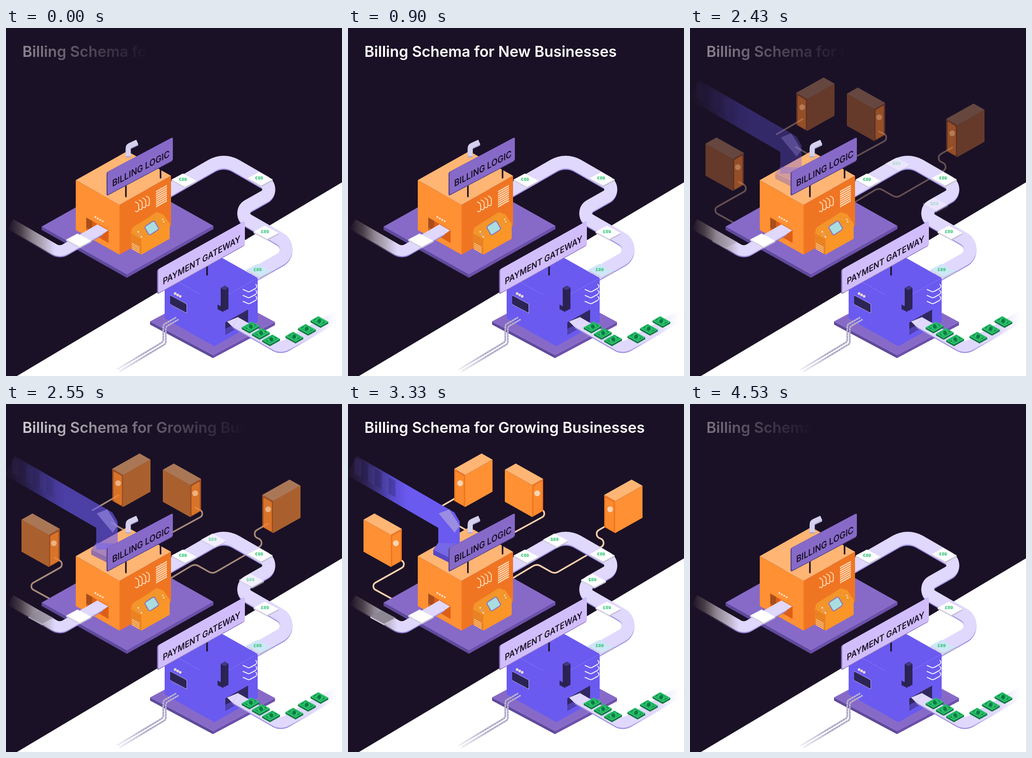
Recreate the animation shown at these times as an HTML page with a canvas. Size 737x760 px, loop 4.56 s.

```html
<!DOCTYPE html>
<html lang="en">
<head>
<meta charset="utf-8">
<title>Billing Schema</title>
<style>
html, body { margin: 0; width: 100%; height: 100%; overflow: hidden; background: #1a1126; }
canvas { display: block; }
</style>
</head>
<body>
<canvas id="stage" width="737" height="760"></canvas>
<script>
const ctx = document.getElementById('stage').getContext('2d');
const LOOP = 4560, ISO = .56;
const DARK = '#1a1126', WHITE = '#fff', CREAM = '#ffd9b5';
const BELT = '#e0d8fd', RIM = '#9c8ee2', VIOLET = '#876ac8', SHADE = '#5f4a9c', BLUE = '#6a5af0';
const ORANGE = '#ff9033', DEEP = '#f07522', PEACH = '#ffb574', NIGHT = '#2c2455', GREEN = '#0d7a41';
const FONT = 'Inter, "Open Sans", sans-serif';
const clamp = v => Math.max(0, Math.min(1, v));
const times = (n, fn) => { for (let i = 0; i < n; i++) fn(i); };

function poly(fill, ...p) {
  ctx.beginPath();
  for (let i = 0; i < p.length; i += 2) ctx.lineTo(p[i], p[i + 1]);
  ctx.closePath();
  ctx.fillStyle = fill;
  ctx.fill();
}

// upright panel whose horizontal edges follow the slope
function slab(fill, x, y, w, h, slope, r = 0) {
  ctx.save();
  ctx.transform(1, slope, 0, 1, x, y);
  ctx.beginPath();
  ctx.roundRect(0, 0, w, h, r);
  ctx.restore();
  ctx.fillStyle = fill;
  ctx.fill();
}

// block seen from its front top corner: a to the left, b to the right, h down
function prism(x, y, a, b, h, left, right, top, k = ISO) {
  slab(left, x - a, y - a * k, a, h, k);
  slab(right, x, y, b, h, -k);
  poly(top, x, y, x - a, y - a * k, x + b - a, y - (a + b) * k, x + b, y - b * k);
}

function line(d, color, width) {
  ctx.strokeStyle = color;
  ctx.lineWidth = width;
  ctx.lineCap = ctx.lineJoin = 'round';
  ctx.stroke(new Path2D(d));
}

// rounded polyline; points: x, y, corner radius
function track(points, color, width, cap = 'butt') {
  ctx.beginPath();
  ctx.moveTo(...points[0]);
  points.slice(1).forEach(([x, y, r], i) => {
    const next = points[i + 2];
    if (next && r) ctx.arcTo(x, y, next[0], next[1], r);
    else ctx.lineTo(x, y);
  });
  ctx.lineCap = cap;
  ctx.lineJoin = 'bevel';
  ctx.lineWidth = width;
  ctx.strokeStyle = color;
  ctx.stroke();
}

function belt(points, width, top, rim) {
  at(0, 2.5, () => track(points, rim, width));
  track(points, top, width);
}

function dot(x, y, r, color) {
  ctx.beginPath();
  ctx.arc(x, y, r, 0, 7);
  ctx.fillStyle = color;
  ctx.fill();
}

function fade(x0, x1, ...colors) {
  const g = ctx.createLinearGradient(x0, 0, x1, 0);
  colors.forEach((c, i) => g.addColorStop(i / (colors.length - 1), c));
  return g;
}

function at(x, y, draw, flip) {
  ctx.save();
  ctx.translate(x, y);
  if (flip) ctx.scale(-1, 1);
  draw();
  ctx.restore();
}

function paper(x, y, label, top = WHITE) {
  at(x, y, () => {
    prism(2, 14, 30, 25, 3, '#d2cede', '#c4c0d2', top, .53);
    ctx.fillStyle = '#35c878';
    ctx.font = '800 9px ' + FONT;
    ctx.textAlign = 'center';
    ctx.fillText(label, -3, 1);
  });
}

function sign(text, x, y, w, h, slope, face, edge, size) {
  slab(edge, x - 2.5, y + 1, w + 2, h + 2, slope, 4);
  slab(face, x, y, w, h, slope, 3);
  ctx.save();
  ctx.transform(.866, slope * .866, 0, 1, x + 10, y + h / 2 + 2);
  ctx.font = `600 ${size}px ${FONT}`;
  ctx.textAlign = 'left';
  ctx.textBaseline = 'middle';
  ctx.fillStyle = DARK;
  ctx.fillText(text, 0, 0);
  ctx.restore();
}

function server(x, y, flip) {
  at(x, y, () => {
    prism(24, 46, 24, 60, 70, DEEP, ORANGE, PEACH);
    slab('#fb8a2e', 3, 38, 18, 65, ISO, 3);
    dot(13, 64, 6.3, '#f8d5b4');
  }, flip);
}

function wires() {
  [
    [[247, 199], [190, 232]],
    [[232, 260], [264, 278]],
    [[415, 226], [441, 239, 9], [360, 283]],
    [[575, 261], [533, 285, 10], [573, 302, 10], [453, 371, 16], [414, 349, 16], [362, 380]],
    [[107, 336], [132, 350, 9], [46, 398, 9], [143, 451, 7], [143, 409, 8], [167, 397]]
  ].forEach(p => track(p, '#fdd2ae', 3.6, 'round'));
}

function duct() {
  belt([[8, 134], [221.5, 257], [221.5, 318]], 47, fade(6, 130, '#21162e', '#2c2150', '#40358a', '#5a4cd0', BLUE), 'transparent');
  times(6, i => slab(i % 2 ? 'rgba(40,30,80,.3)' : 'rgba(90,80,170,.15)', 14 + i * 15, 116 + i * 8.6, 15, 36, .58));
  poly('#9a8de2', 199, 239, 222, 230, 245, 266, 234, 281);
  poly('#7668e6', 187, 318, 198, 303, 245, 305, 222, 337);
  slab('#5748c4', 187, 318, 36, 11, .5);
}

function consoleBox() {
  const top = '#f3952a';
  prism(297, 461, 23, 62, 34, '#e98222', '#fa9527', top);
  poly(top, 274, 448, 277, 436, 331, 402, 345, 407, 359, 427, 297, 461);
  ctx.save();
  ctx.transform(.86, -.56, .5, .86, 302, 434);
  [['#8b78b5', 0, 5], ['#a9dde2', 2.2, 3]].forEach(([color, inset, r]) => {
    ctx.beginPath();
    ctx.roundRect(inset, inset, 27 - 2 * inset, 24 - 2 * inset, r);
    ctx.fillStyle = color;
    ctx.fill();
  });
  ctx.restore();
  times(3, i => dot(290 + i * 3.5, 445 + i * 5.5, 2, i % 2 ? '#b9a4d8' : CREAM));
  times(2, i => dot(344 + i * 2, 418 + i * 5, 1.7, CREAM));
  times(4, i => slab(CREAM, 276, 469 + i * 4, 17, 1.4, ISO));
}

function billing(grow) {
  prism(265, 538.5, 187, 190, 7, SHADE, '#6c50ad', VIOLET);
  prism(249, 386, 96, 113, 109, ORANGE, DEEP, PEACH);

  slab('#dd5f16', 176, 414, 49, 28, ISO);
  slab('#a84e1c', 176, 414, 13, 22, ISO);
  times(4, i => dot(196 + i * 5.4, 413 + i * 3, 2.3, CREAM));
  times(4, i => at(i * 7.8, i * -4.3, () =>
    line('M284 380 L288 382 Q291 384 291 388 L291 396 Q291 403 284 400', CREAM, 2)));
  times(8, i => slab(CREAM, 329, 356 + i * 4.7, 24, 3, -ISO));
  consoleBox();

  if (grow) {
    ctx.globalAlpha = grow;
    duct();
    ctx.globalAlpha = 1;
  }

  belt([[268, 280], [268, 258, 7], [288, 249]], 11, '#d5d0ee', '#aaa2d2');
  line('M263 345 V368 M339 306 V327', DARK, 3.4);
  sign('BILLING LOGIC', 223, 314, 143, 50, -.528, VIOLET, '#56438f', 20.3);
}

function bill(x, y, flip) {
  at(x, y, () => {
    prism(-3, 11, 17, 22, 4, GREEN, GREEN, '#2bc56d');
    line('M-14 2 L3 -8 L13 -1.5 L-3 7.5 Z', '#149350', 1.2);
    [-9, 0, 9].forEach(d => dot(d, -d * .4, d ? 1.5 : 4.4, GREEN));
  }, flip);
}

function payment() {
  prism(454, 714, 138, 136, 7, SHADE, '#6c50ad', VIOLET, .53);
  prism(457, 599, 109, 95, 96, BLUE, BLUE, BLUE);

  times(3, i => dot(371 + i * 5.5, 580 + i * 3, 2.9, '#ead9cf'));
  slab('#b9a9e4', 360, 583, 37, 21, .53, 2);
  slab(NIGHT, 360, 584, 36, 19, .53, 2);
  slab(NIGHT, 464, 604, 13, 10, .5);
  prism(479, 572, 8, 9, 46, '#2a2250', NIGHT, '#443a80');
  times(3, i => at(0, 2 + i * 13, () =>
    line('M520 569 L529 573 Q532 575 536 573 L547 567 Q553 563 548 558', '#f3effc', 2)));
  slab('#30285f', 481, 643, 50, 27, -ISO);
  slab('#5041b0', 481, 657, 25, 12, -.5);

  const clear = 'rgba(255,255,255,0)';
  belt([[503, 642], [603, 699, 25], [734, 625]], 24, fade(680, 736, BELT, clear), fade(620, 730, RIM, clear));
  poly(BELT, 485, 641, 509.5, 631, 497, 653);
  times(3, i => bill(537 + i * 22.5, 652 + i * 14));
  times(3, i => bill(632 + i * 27.5, 674 - i * 17, true));

  const cable = [[373, 632], [345, 648, 8], [345, 685, 8], [243, 746]];
  times(2, i => at(i * 5.5, i * 4.5, () => {
    track(cable, fade(240, 300, 'rgba(190,182,214,.15)', '#aaa2c4'), 3.6);
    ctx.setLineDash([2, 4]);
    track(cable, 'rgba(225,220,240,.7)', 2.4);
    ctx.setLineDash([]);
  }));

  line('M441 518 V539', DARK, 3.4);
  sign('PAYMENT GATEWAY', 334, 527, 190, 52, -.556, '#d1bdfc', '#8d77c4', 19.5);
}

function title(text, left, alpha) {
  const shown = 2 * (1 - Math.pow(clamp(left / 1080), 1.55));
  ctx.font = `600 32.7px ${FONT}`;
  ctx.textAlign = 'left';
  const w = ctx.measureText(text).width, edge = 37 + shown * w;
  ctx.globalAlpha = alpha;
  ctx.fillStyle = fade(edge - w, edge, WHITE, 'rgba(255,255,255,0)');
  ctx.fillText(text, 36, 63);
  ctx.globalAlpha = 1;
}

function draw(t) {
  const grow = t < 4230 ? clamp((t - 2300) / 400) : clamp((4500 - t) / 270);
  const faded = fn => { if (grow) { ctx.globalAlpha = grow; fn(); ctx.globalAlpha = 1; } };

  ctx.fillStyle = DARK;
  ctx.fillRect(0, 0, 737, 760);
  poly(WHITE, 737, 337, 737, 760, 24, 760);

  faded(() => {
    wires();
    server(233, 109);
    server(562, 166);
    server(428, 131, true);
    server(118, 240, true);
  });

  belt([[350, 358], [477.6, 285, 52], [595, 352, 18], [503, 404, 18], [641, 483, 26], [540, 540]], 28, BELT, RIM);
  paper(391, 333, '€89');
  paper(558, 330, '€89');
  paper(571, 447, '£89');
  paper(555, 530, '£89', fade(527, 542, '#cfe6f8', WHITE));
  faded(() => {
    paper(456, 298, '$89');
    paper(539, 386, '$89');
  });

  billing(grow);
  belt([[10, 428], [118, 490, 25], [207, 439]], 24,
    fade(8, 108, '#21172b', '#4a4049', '#8d8590', '#b5adbe', BELT), fade(8, 122, DARK, '#3b304e', RIM));
  poly(BELT, 200.5, 429, 224, 442, 213, 449.5);
  faded(() => paper(77, 466, '', fade(50, 104, '#8d8793', '#e4e1e8', WHITE)));
  paper(160, 464, '');
  payment();

  const wrapped = t >= 4380;
  if (wrapped || t < 2250)
    title('Billing Schema for New Businesses', (wrapped ? LOOP : 0) + 900 - t, wrapped ? 1 : clamp((2250 - t) / 180));
  else
    title('Billing Schema for Growing Businesses', 3330 - t, clamp((4380 - t) / 150));
}

const start = performance.now();
function tick() {
  draw((performance.now() - start) % LOOP);
  requestAnimationFrame(tick);
}
tick();
</script>
</body>
</html>
```
